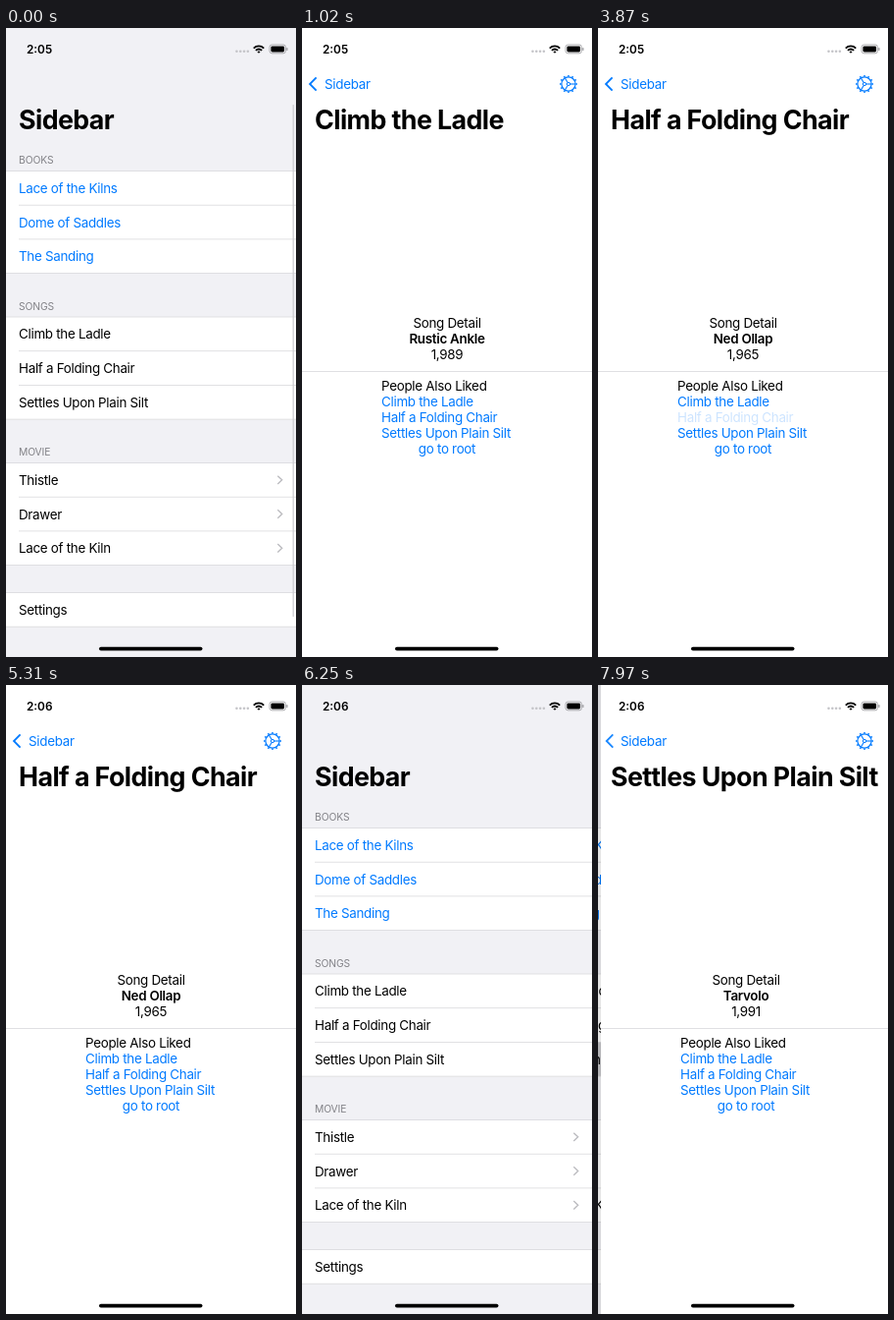
Recreate the animation shown at these times as an HTML page with a canvas. Size 296x640 px, loop 8000 ms.

```html
<!DOCTYPE html>
<html lang="en">
<head>
<meta charset="utf-8">
<title>Sidebar navigation</title>
<style>
html, body { margin: 0; width: 100%; height: 100%; overflow: hidden; background: #fff; }
canvas { display: block; width: 296px; height: 640px; }
</style>
</head>
<body>
<canvas id="stage"></canvas>
<script>
const W = 296, H = 640, LOOP = 8000;
const BODY = 13.4, LARGE = 26.8, ROW = 34.7;
const BLUE = '#007aff', BLACK = '#000', GREY = '#d9d9dc';
const canvas = document.getElementById('stage');
const dpr = window.devicePixelRatio || 1;
canvas.width = W * dpr;
canvas.height = H * dpr;
const c = canvas.getContext('2d');

const SONGS = ['Climb the Ladle', 'Half a Folding Chair', 'Settles Upon Plain Silt'];
const ARTISTS = ['Rustic Ankle', 'Ned Ollap', 'Tarvolo'];
const YEARS = ['1,989', '1,965', '1,991'];
const SECTIONS = [
  { top: 145.5, head: 'BOOKS', color: BLUE, rows: ['Lace of the Kilns', 'Dome of Saddles', 'The Sanding'] },
  { top: 294, head: 'SONGS', rows: SONGS },
  { top: 442.5, head: 'MOVIE', arrow: true, rows: ['Thistle', 'Drawer', 'Lace of the Kiln'] },
  { top: 574.5, rows: ['Settings'] }
];

const clamp = v => Math.max(0, Math.min(1, v));
const mix = (a, b, k) => a + (b - a) * k;
// Critically damped spring: 1 at the start, falling to 0
const spring = ms => {
  if (ms <= 0) return 1;
  const k = ms * 0.0178;
  return (1 + k) * Math.exp(-k);
};

function text(str, x, y, { size = BODY, weight = 400, color = BLACK, align = 'left', alpha = 1, track = -0.022 } = {}) {
  c.globalAlpha = alpha;
  c.font = `${weight} ${size}px Inter, "Liberation Sans", sans-serif`;
  c.letterSpacing = size * track + 'px';
  c.textAlign = align;
  c.fillStyle = color;
  c.fillText(str, x, y + size * 0.36);
  c.globalAlpha = 1;
}

function rect(x, y, w, h, color, alpha = 1) {
  c.globalAlpha = alpha;
  c.fillStyle = color;
  c.fillRect(x, y, w, h);
  c.globalAlpha = 1;
}

function pill(x, y, w, h, r, color) {
  c.fillStyle = color;
  c.beginPath();
  c.roundRect(x, y, w, h, r);
  c.fill();
}

function line(points, color, width, alpha = 1) {
  c.globalAlpha = alpha;
  c.strokeStyle = color;
  c.lineWidth = width;
  c.beginPath();
  points.forEach(([x, y]) => c.lineTo(x, y));
  c.stroke();
  c.globalAlpha = 1;
}

function arc(x, y, r, from, to, width, color) {
  c.strokeStyle = color;
  c.lineWidth = width;
  c.beginPath();
  c.arc(x, y, r, from, to);
  c.stroke();
}

function gear(alpha) {
  c.save();
  c.translate(272, 57);
  c.globalAlpha = alpha;
  arc(0, 0, 7.1, 0, 7, 1.2, BLUE);
  arc(0, 0, 1.7, 0, 7, 1, BLUE);
  for (let i = 0; i < 12; i++) {
    const a = i * Math.PI / 6, x = Math.cos(a), y = Math.sin(a);
    line([[x * 7.4, y * 7.4], [x * 9, y * 9]], BLUE, 1.5, alpha);
    if (i % 4 === 0) line([[x * 2, y * 2], [x * 7, y * 7]], BLUE, 1.1, alpha);
  }
  c.restore();
}

function statusBar(time) {
  text(time, 21, 21.5, { size: 11.8, weight: 600, track: 0 });
  for (let i = 0; i < 4; i++) pill(234.2 + i * 3.8, 22.4, 2.5, 2.5, 1.2, '#c4c4c8');
  arc(258, 25.8, 1.1, -2.36, -0.78, 2.2, BLACK);
  arc(258, 25.8, 4.3, -2.36, -0.78, 1.8, BLACK);
  arc(258, 25.8, 7.4, -2.36, -0.78, 1.8, BLACK);
  c.strokeStyle = '#9a9a9e';
  c.lineWidth = 0.8;
  c.beginPath();
  c.roundRect(269, 17, 16.5, 8.8, 2.5);
  c.stroke();
  pill(270.4, 18.4, 13.7, 6, 1.4, BLACK);
  pill(286.3, 20, 1.2, 3, 0.6, '#9a9a9e');
}

function sidebar(p, picked, glow, scrollbar) {
  c.save();
  c.translate(-0.3 * W * (1 - p), 0);
  rect(0, 0, W, H, '#f1f1f5');
  SECTIONS.forEach(({ top, head, rows, color, arrow }, s) => {
    if (head) text(head, 13, top - 10.8, { size: 10.3, color: '#828287', track: -0.01 });
    const height = rows.length * ROW;
    rect(0, top, W, height, '#fff');
    rows.forEach((row, i) => {
      const y = top + i * ROW, mid = y + ROW / 2;
      if (s === 1 && i === picked) rect(0, y, W, ROW, '#cacacd', glow);
      if (i) rect(13, y - 0.4, W, 0.8, GREY);
      text(row, 13, mid + 0.2, { color });
      if (arrow) line([[277.3, mid - 4.2], [281.7, mid], [277.3, mid + 4.2]], '#bcbcc0', 1.4);
    });
    rect(0, top - 0.4, W, 0.8, GREY);
    rect(0, top + height - 0.4, W, 0.8, GREY);
  });
  if (scrollbar) pill(292.6, 78, 1.2, 521, 0.6, '#c8c8cd');
  c.restore();
  rect(0, 0, W, H, BLACK, 0.1 * (1 - p));
}

function detail(x, song, lift, links) {
  rect(x, 0, W, H, '#fff');
  c.save();
  c.translate(x, -lift);
  text('Song Detail', 148, 300, { align: 'center' });
  text(ARTISTS[song], 148, 316, { align: 'center', weight: 600 });
  text(YEARS[song], 148, 332, { align: 'center' });
  rect(0, 349, W, 0.8, GREY);
  text('People Also Liked', 81, 364.5);
  SONGS.forEach((s, i) => text(s, 81, 380.5 + i * 16, { color: BLUE, alpha: links[i] }));
  text('go to root', 148, 428.5, { align: 'center', color: BLUE });
  c.restore();
}

// p: 1 = list on top, 0 = detail on top
function navBar(p, song, inline, backAlpha) {
  const x = W * p;
  if (p < 1) {
    if (inline) {
      text(SONGS[song], 148 + 0.64 * x, 57, { weight: 600, align: 'center', alpha: clamp(1.15 - 3 * p) });
    } else {
      // The large title runs slightly ahead of the page
      text(SONGS[song], 13 + Math.max(0, x - 9), 93.5, { size: LARGE, weight: 700, alpha: clamp((1 - p) * 1.3) });
      gear(clamp((1 - p) * 1.6));
    }
    const shift = 70 * p;
    line([[14.6 + shift, 50.4], [8 + shift, 57], [14.6 + shift, 63.6]], BLUE, 1.8, clamp(1 - 9 * p) * backAlpha);
  }
  const k = 1 - p * p;
  text('Sidebar', mix(23, 13, p), mix(57, 93.5, p), {
    size: mix(BODY, LARGE, p),
    weight: Math.round(mix(400, 700, p)),
    color: `rgb(0,${122 * k},${255 * k})`,
    alpha: backAlpha
  });
}

// Pressed link dims at once, then fades back
const linkAlpha = (t, press, end) =>
  t < press || t >= end ? 1 : mix(0.2, 1, clamp((t - press - 80) / (end - press - 80)));

function draw(t) {
  const PUSH = 500, SETTLE = 1010, PICK = 3790, BACK = 5610, POP = 5720, LIST = 6250, PUSH2 = 7600;
  let p;
  if (t < SETTLE) p = spring(t - PUSH);
  else if (t < POP) p = 0;
  else if (t < LIST) p = 1 - spring(t - POP);
  else p = spring(t - PUSH2);

  const song = t < PICK + 80 ? 0 : t < LIST ? 1 : 2;
  const inline = t < SETTLE;
  let glow = 0;
  if (t >= PUSH && t < POP || t >= PUSH2) glow = 1;
  else if (t >= POP && t < LIST) glow = clamp((1 - p) * 2);

  c.setTransform(dpr, 0, 0, dpr, 0, 0);
  sidebar(p, song, glow, t < SETTLE);
  if (p < 1) {
    const links = [linkAlpha(t, 2610, 3080), linkAlpha(t, PICK, 4310), 1];
    detail(W * p, song, inline ? 20.5 : 0, links);
  }
  navBar(p, song, inline, t >= BACK && t < POP ? 0.3 : 1);
  statusBar(t < 5310 ? '2:05' : '2:06');
  pill(95, 629.7, 105.5, 3.8, 1.9, BLACK);
}

const start = performance.now();
function frame() {
  draw((performance.now() - start) % LOOP);
  requestAnimationFrame(frame);
}
frame();
</script>
</body>
</html>
```
